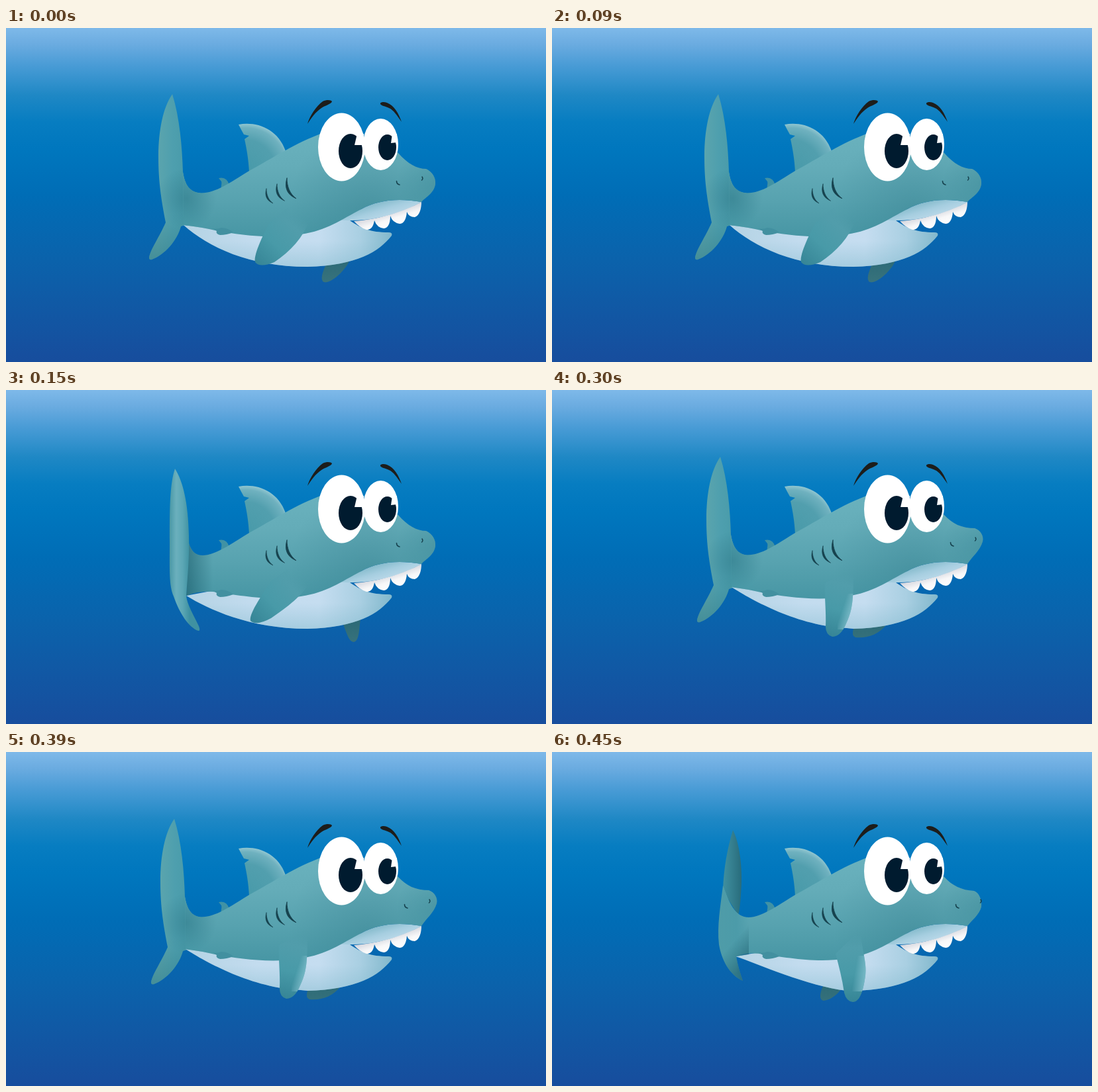
Recreate the animation shown at these times as an HTML page with a canvas. Size 815 by 505 pixels, loop 0.6 s.

```html
<!DOCTYPE html>
<html lang="en">
<head>
<meta charset="utf-8">
<title>Swimming shark</title>
<style>
html, body { margin: 0; width: 100%; height: 100%; overflow: hidden; background: #0076bd; }
canvas { display: block; }
</style>
</head>
<body>
<canvas id="sea" width="815" height="505"></canvas>
<script>
const ctx = document.getElementById('sea').getContext('2d');
const STEP = 150;

function stops(grad, colors) {
  colors.forEach((c, i) => Array.isArray(c)
    ? grad.addColorStop(c[0], c[1])
    : grad.addColorStop(i / (colors.length - 1), c));
  return grad;
}
const linear = (x0, y0, x1, y1, ...colors) => stops(ctx.createLinearGradient(x0, y0, x1, y1), colors);
const radial = (x, y, r, ...colors) => stops(ctx.createRadialGradient(x, y, 0, x, y, r), colors);

function fill(path, ...paints) {
  const shape = new Path2D(path);
  for (const paint of paints) {
    ctx.fillStyle = paint;
    ctx.fill(shape);
  }
}

function stroke(path, width, color = '#17424e') {
  ctx.strokeStyle = color;
  ctx.lineWidth = width;
  ctx.lineCap = 'round';
  ctx.stroke(new Path2D(path));
}

function oval(x, y, rx, ry, color) {
  ctx.fillStyle = color;
  ctx.beginPath();
  ctx.ellipse(x, y, rx, ry, 0, 0, Math.PI * 2);
  ctx.fill();
}

const sea = linear(0, 0, 0, 505, [0, '#7eb9e9'], [0.05, '#6aabe0'], [0.11, '#4a9cd6'],
  [0.2, '#1f88c5'], [0.28, '#077dc1'], [0.36, '#0077be'], [0.5, '#006db6'],
  [0.7, '#0b62ab'], [1, '#174d9d']);
const skin = linear(0, 155, 0, 316, '#6ab2be', '#64acb8', '#57a2af', '#4796a4');
const jawShade = radial(545, 272, 120, 'rgba(38,112,128,.28)', 'rgba(38,112,128,0)');
const snoutShade = radial(655, 235, 65, 'rgba(45,125,140,.4)', 'rgba(45,125,140,0)');
const tailShade = linear(272, 0, 312, 0, 'rgba(20,85,100,.55)', 'rgba(20,85,100,0)');
const jointShade = radial(272, 258, 46, 'rgba(40,112,128,.42)', 'rgba(40,112,128,0)');
const white = linear(270, 0, 582, 0, [0, '#b4d3e4'], [0.35, '#c3dcef'], [0.65, '#c5ddf0'],
  [0.85, '#a9cfe2'], [1, '#82b8cc']);
const bellyShade = linear(0, 322, 0, 361, 'rgba(120,180,200,0)', 'rgba(120,180,200,.4)');
const lip = linear(570, 258, 579, 288, '#7fb7c8', '#a6cee0', '#bfdbeb');
const finDark = linear(0, 350, 0, 385, '#2c6a77', '#38737c');

const tailWide = {
  tail: 'M251 100C262 135 266 180 267 218C270 237 277 249 293 249.5L293 295L270 298L264 300C259 320 240 343 220 350Q216 351 216 347C218 335 232 315 241 294C235 262 230 235 230 195C230 155 237 120 251 100Z',
  join: [267, 218, 'C270 237 277 249 293 249.5', 268, 298]
};
const bellyFull = 'C305 331 367 361 455 361';
const snoutLow = 'C606 205 620 213 634 213C643 217 649 226 648 236C646 250 634 255 627 263';

const poses = [
  {
    ...tailWide, shift: [0, 0], belly: bellyFull,
    snout: snoutLow, nose: [0, 0, 0, 0],
    fin: 'M428 268L458 291C448 317 430 337 405 354Q383 363 376 354C373 345 386 316 398 294Z',
    finBox: [445, 285, 380, 355],
    far: 'M484 354C480 366 474 376 478 383C485 390 512 370 520 348Z'
  },
  {
    join: [276, 232, 'C280 243 285 250 297 250', 272, 311], belly: bellyFull,
    tailFront: 'M255 119C267 138 275 170 276 220C277 252 274 282 272 311C273 324 284 342 291 357Q294 365 290 364C276 359 262 338 253 312C246 295 247 275 247 230C247 180 247 143 255 119Z',
    snout: snoutLow, nose: [0, 0, 0, 0],
    fin: 'M428 268L459 290C448 310 425 328 400 345Q378 357 369 349C366 340 384 313 400 289Z',
    finBox: [445, 285, 375, 350],
    far: 'M508 352C514 366 517 381 525 381C533 380 533 362 535 345Z'
  },
  {
    ...tailWide, shift: [3, 1], belly: 'C302 318 372 357 445 360',
    snout: 'C604 202 618 209 638 209C647 212 652 221 650 229C646 243 634 252 627 263',
    nose: [12, -1, 11, -2],
    fin: 'M456 268C453 300 458 325 444 353C438 368 430 373 423 373Q413 370 413 358C414 335 411 315 412 292Z',
    finBox: [445, 275, 420, 370], glow: [440, 325, 455, 330],
    far: 'M456 358C453 367 453 372 458 374C475 376 495 369 505 354Z'
  },
  {
    join: [258, 202, 'C267 228 276 250 297 250', 277, 309], belly: 'C310 320 385 354 445 361',
    tailBack: 'M273 118C285 142 288 185 285 215Q284 235 281 247L258 210C259 175 265 145 273 118Z',
    tailFront: 'M258 202C267 228 276 250 297 250L297 306L278 309C280 322 284 334 288 346C268 337 256 315 252 291C249 262 254 235 258 202Z',
    snout: 'C604 202 618 209 637 210C645 213 649 224 648 234C645 246 634 254 627 263',
    nose: [20, -1, 19, -2],
    fin: 'M466 268C466 295 476 318 473 338C470 360 465 378 454 378Q444 377 441 364C438 343 433 324 428 305Z',
    finBox: [455, 275, 455, 375], glow: [456, 338, 474, 341],
    far: 'M409 354C404 365 403 375 410 376C420 375 431 367 438 356Z'
  }
];

function drawSmallFins() {
  fill('M351 146C378 141 410 152 422 186L367 218C366 198 363 182 360 168L367 163L359 161Q355 154 351 146Z',
    radial(362, 214, 74, [0, '#489aa9'], [0.6, '#529fae'], [0.85, '#6fb1bf'], [1, '#a8d5dd']));
  fill('M321 227Q333 224 337 237L324 244Q326 234 325 232Z', '#4192a4');
}

function drawTail(p) {
  const teal = linear(228, 0, 300, 0, '#5ca5ad', '#4e9fae', '#489aa8', '#5aa4b1');
  if (p.tail) {
    ctx.save();
    ctx.translate(...p.shift);
    fill(p.tail, teal, jointShade, linear(0, 280, 0, 350, 'rgba(45,120,132,0)', 'rgba(45,120,132,.5)'));
    ctx.restore();
  }
  if (p.tailBack) fill(p.tailBack, linear(258, 0, 287, 0, '#4090a0', '#347e8e', '#286b7a'));
}

function drawBody(p) {
  const [x, y, curve, bx, by] = p.join;
  const [dx, dy] = p.shift || [0, 0];
  const low = p.tailFront ? 'C400 320 350 310 320 306Q295 302 ' : 'C400 320 350 312 320 307Q295 301 ';
  fill(`M${bx + dx} ${by}${p.belly}L455 361C530 359 563 338 582 314Q584 309 577 309C550 309 536 303 519 291
    L480 285L330 300Z`, white, bellyShade);
  fill('M519 291C562 292 605 276 627 263C590 257 562 260 536 274L480 290Z', lip);
  fill('M525 292C560 290 600 278 627 263C627 273 624 284 617 286Q608 286 605 278C604 290 600 296 594 296Q583 294 580 284C580 298 575 303 570 303Q560 302 556 291C554 303 549 305 544 305Q534 302 525 292Z',
    linear(570, 280, 577, 303, '#d6d8df', '#f7f7f8', '#ffffff'));
  const body = `M${x + dx} ${y + dy}${p.shift ? `C${270 + dx} 237 ${277 + dx} 249 295 249.5` : curve}
    C316 249.5 338 234 367 216C400 198 440 172 478 159C500 160 560 165 592 189${p.snout}
    C590 257 562 260 536 274C505 290 485 306 445 312${low}${bx + dx} ${by}Z`;
  fill(body, skin, jawShade, snoutShade);
  if (p.tailFront && !p.tailBack) fill(body, tailShade);
  if (p.tail) fill(body, linear(266, 0, 310, 0, 'rgba(72,154,168,.8)', 'rgba(72,154,168,0)'), jointShade);
  fill('M312 303Q318 305 325 302Q337 303 343 309Q333 313 323 313Q316 311 318 307Z', '#4290a0');
}

function drawTailFront(p) {
  if (!p.tailFront) return;
  if (p.tailBack) {
    fill(p.tailFront,
      linear(250, 0, 297, 0, [0, '#4f9ca8'], [0.6, '#4c9ba9'], [1, 'rgba(76,155,169,0)']),
      linear(258, 305, 284, 328, 'rgba(38,105,120,0)', 'rgba(38,105,120,.7)'));
  } else {
    fill(p.tailFront, linear(247, 0, 277, 0, '#4a98a6', '#6bb0bd', '#5ba6b4', '#3f91a1'));
  }
}

function drawFace(p) {
  oval(506.5, 180, 35.5, 51.5, '#fff');
  oval(565.5, 176, 26.5, 39, '#fff');
  oval(520, 186, 18, 26, '#001b2f');
  oval(575.5, 180.5, 13.5, 19.5, '#001b2f');
  fill('M530 160L526 177L540 177L540 160Z', '#fff');
  fill('M583 160L581 174L590 173L590 160Z', '#fff');
  fill('M455 145C458 134 468 118 478 111C484 108 491 109 492 111C491 115 482 117 476 121C467 127 460 137 455 145Z', '#1d1d1b');
  fill('M565 115C564 112 570 111 575 113C586 117 593 130 597 142C590 132 585 124 578 121C572 118 567 118 565 115Z', '#1d1d1b');

  const gill = 'M0 0c-3 10 0 18 10 22c-7 -5 -10 -13 -10 -22Z';
  for (const [x, y, k] of [[393, 243, 1], [409, 236, 1.15], [424, 227, 1.4]]) {
    ctx.save();
    ctx.translate(x, y);
    ctx.scale(k, k);
    fill(gill, '#17424e');
    stroke(gill, 0.6);
    ctx.restore();
  }
  const [ax, ay, bx, by] = p.nose;
  stroke(`M${589.5 + ax} ${231.5 + ay}q0 4.5 4.5 5.5`, 1.6);
  stroke(`M${628 + bx} ${225 + by}q2 3 -.5 5`, 1.5);
}

function drawFin(p) {
  fill(p.fin, linear(...p.finBox, 'rgba(82,157,171,0)', [0.2, '#519dab'], [0.6, '#489aa8'], [1, '#378697']));
  if (!p.glow) return;
  ctx.save();
  ctx.clip(new Path2D(p.fin));
  const [x0, y0, x1, y1] = p.glow;
  fill(`M${x0 - 9} 308H${x1 + 9}V362H${x0 - 9}Z`,
    linear(x0, y0, x1, y1, 'rgba(150,205,218,0)', 'rgba(150,205,218,.65)'));
  ctx.restore();
}

function draw(p) {
  ctx.fillStyle = sea;
  ctx.fillRect(0, 0, 815, 505);
  fill(p.far, finDark);
  drawSmallFins();
  drawTail(p);
  drawBody(p);
  drawTailFront(p);
  drawFin(p);
  drawFace(p);
}

const start = performance.now();
function tick(now) {
  const t = Math.max(0, now - start);
  draw(poses[Math.floor(t / STEP) % poses.length]);
  requestAnimationFrame(tick);
}
tick(start);
</script>
</body>
</html>
```
